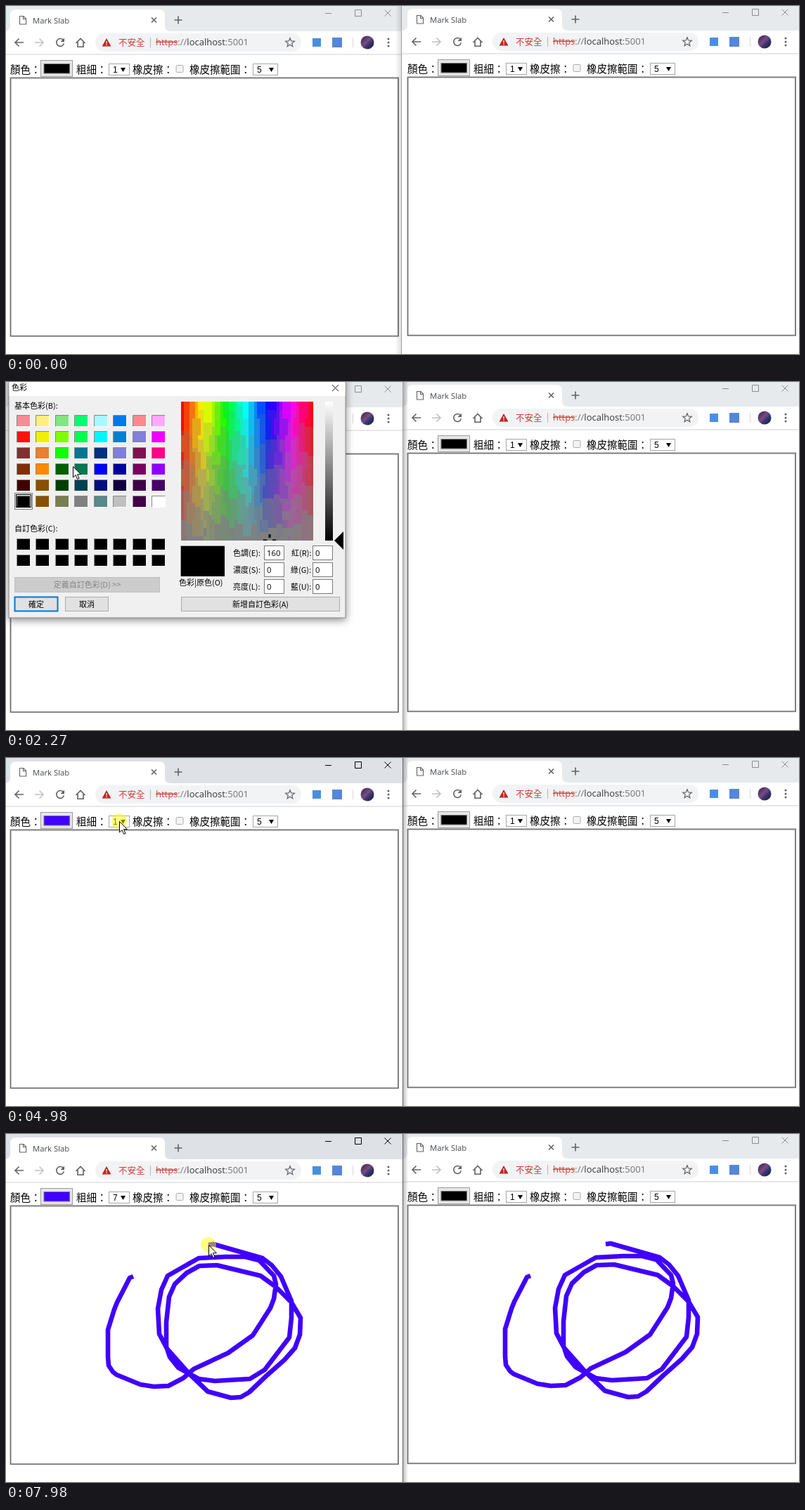
Write an HTML page that moves like this. It is 1128 px wide and 496 px high and loops after 8 s.

```html
<!DOCTYPE html>
<html lang="zh-Hant">
<head>
<meta charset="utf-8">
<title>Mark Slab</title>
<style>
  html, body { margin: 0; width: 100%; height: 100%; overflow: hidden; background: #fff; }
  svg { display: block; width: 1128px; height: 496px; }
  text { font-family: "Noto Sans CJK TC", "Noto Sans CJK JP", sans-serif; white-space: pre; }
  .ui { font-family: "Open Sans", "Noto Sans", sans-serif; }
  .form { font-family: "Liberation Sans", sans-serif; }
  .line { fill: none; stroke: #5f6368; stroke-width: 1.6; }
  .ink { fill: none; stroke: #4000ff; stroke-width: 6.6; stroke-linejoin: round; }
  #dialog { filter: drop-shadow(0 3px 6px #0007); }
</style>
</head>
<body>
<svg id="stage" viewBox="0 0 1128 496"></svg>
<script>
const LOOP = 8000;
const BLUE = '#4000ff';

const rect = (x, y, w, h, fill, extra = '') =>
  `<rect x="${x}" y="${y}" width="${w}" height="${h}" fill="${fill}" ${extra}/>`;
const path = (d, extra = 'class="line"') => `<path d="${d}" ${extra}/>`;
const text = (x, y, size, str, fill = '#000', extra = '') =>
  `<text x="${x}" y="${y}" font-size="${size}" fill="${fill}" ${extra}>${str}</text>`;
const circle = (x, y, r, fill) => `<circle cx="${x}" cy="${y}" r="${r}" fill="${fill}"/>`;
const times = (n, make) => Array.from({ length: n }, (_, i) => make(i)).join('');

function dropdown(x, w, value, id) {
  return rect(x + .5, 82.5, w - 1, 16, '#fff', 'stroke="#a6a6a6"') +
    text(x + 6, 95, 12, value, '#000', `class="form" id="${id}"`) +
    path(`M${x + w - 13} 88h7l-3.5 6z`, '');
}

function starPoints(cx, cy) {
  return times(10, i => {
    const r = i % 2 ? 2.9 : 6.6, a = i * Math.PI / 5 - Math.PI / 2;
    return `${cx + r * Math.cos(a)},${cy + r * Math.sin(a)} `;
  });
}

function browser(id) {
  const tab = 'M-2 36Q6 36 6 28V13Q6 5 14 5H218Q226 5 226 13V28Q226 36 234 36Z';
  return rect(0, 0, 565, 498, '#fff') +
    rect(0, 0, 565, 36, '#e7eaed', `id="${id}Strip"`) + path(tab, 'fill="#fff"') +
    path('M19.5 14.5h5.5l3.5 3.5v8h-9zM24.5 14.5v4h4', 'class="line" style="stroke-width:1.1"') +
    text(38, 25, 11.3, 'Mark Slab', '#45494d', 'class="ui"') +
    path('M207 16.5l7 7m0-7l-7 7M239.5 20h11M245 14.5v11') +
    path('M454 10.5h9M496.5 5.5h9v9h-9zM538.5 5.5l9 9m0-9l-9 9',
      `id="${id}Controls" fill="none" stroke="#8b8d90"`) +
    path('M25 52H13M18.5 46.5L13 52l5.5 5.5') +
    path('M41 52h12M47.5 46.5L53 52l-5.5 5.5', 'class="line" style="stroke:#bdc1c6"') +
    path('M81.2 48.3A5.4 5.4 0 1 0 82.4 53.5') + path('M83 45.5v5.5h-5.5z', 'fill="#5f6368"') +
    path('M99.5 53l6.5-6.5 6.5 6.5M102 51v7.2h8V51') +
    rect(127, 39, 293, 26, '#f1f3f4', 'rx="13"') +
    path('M143 46l6.5 11.5h-13z', 'fill="#c5221f"') +
    path('M143 50v3.5M143 54.6v1.4', 'stroke="#fff" stroke-width="1.3"') +
    text(160, 56.5, 12.5, '不安全', '#cf3a34') + rect(205, 45, 1, 14, '#d4a9a7') +
    text(213, 56, 13, '<tspan fill="#c8463f" text-decoration="line-through">https</tspan>' +
      '://<tspan fill="#34383c">localhost</tspan>:5001', '#70757a', 'class="ui"') +
    `<polygon points="${starPoints(404, 52.3)}" class="line" style="stroke-width:1.2"/>` +
    rect(436, 46, 12, 12, '#4a8fdf') + rect(464, 45, 14, 14, '#5586d8') +
    rect(493, 45, 1, 14, '#d5d7da') + circle(514, 52, 9.5, 'url(#avatar)') +
    times(3, i => circle(544, 47 + 5 * i, 1.5, '#5f6368')) +
    rect(0, 68.5, 565, 1, '#cfd1d4') +
    text(6, 96, 14.5, '顏色：') +
    rect(49.5, 77.5, 45, 23, '#e6e6e6', 'stroke="#9c9c9c"') +
    rect(54, 82.5, 36.5, 13.5, '#000', `stroke="#777" id="${id}Swatch"`) +
    text(100, 96, 14.5, '粗細：') + dropdown(146, 30, '1', id + 'Size') +
    text(180, 96, 14.5, '橡皮擦：') +
    rect(242, 84.5, 10, 10, '#f4f4f4', 'stroke="#ababab" rx="1.5"') +
    text(261, 96, 14.5, '橡皮擦範圍：') + dropdown(351, 36, '5', id + 'Eraser') +
    rect(6.5, 102.5, 551.5, 368, '#fff', 'stroke="#717171" stroke-width="1.8"') +
    `<polyline class="ink" id="${id}Ink"/>`;
}

const palette = [
  'f88b95 ffee80 80e880 00ff70 a8f8ff 0078f0 ff8890 ffa8ff',
  'ff1010 f0f000 80ff00 00ff50 00f8ff 0080d0 8080d8 f000ff',
  '803030 e88030 10ff00 007890 003080 8080d8 801050 ff0088',
  '803008 ff8800 006000 007850 0000ff 0000a0 780060 9000ff',
  '400000 885000 004000 004050 001080 100040 400048 480068',
  '000000 885000 788050 808080 588888 c0c0c0 400048 ffffff'
].map(row => row.split(' '));

function cell(col, row, fill, y) {
  const x = Math.round(15 + 27.45 * col) + .5, top = Math.round(y - 8) + .5;
  return rect(x, top, 19, 16, fill) +
    path(`M${x} ${top + 16}v-16h19`, 'fill="none" stroke="#888"') +
    path(`M${x} ${top + 16}h19v-16`, 'fill="none" stroke="#fff"');
}

// Hue runs across in coarse wobbling bands; each band fades to grey in its own steps.
function spectrum() {
  const cols = 47, rows = 33, bands = 26;
  const noise = (a, b) => Math.abs(Math.sin(a * 12.9898 + b * 78.233) * 43758.5453) % 1;
  const channel = (hue, sat, shift) => {
    const k = (shift + hue * 6) % 6;
    const pure = 255 * (1 - Math.max(0, Math.min(k, 4 - k, 1)));
    return Math.round(128 + (pure - 128) * sat);
  };
  return times(cols, i => times(rows, j => {
    const wobble = .8 * (noise(i, j >> 2) - .5);
    const band = Math.round((i + .5) / cols * bands + wobble);
    const step = 7, offset = noise(band, 7) * step;
    const level = Math.floor((j + offset) / step) * step - offset + step / 2;
    const sat = 1 - Math.max(0, Math.min(1, level / rows));
    const rgb = [5, 3, 1].map(s => channel(band / bands, sat, s));
    return rect(249 + 4 * i, 28 + 6 * j, 4, 6, `rgb(${rgb})`);
  }));
}

function button(x, y, w, h, label, id, stroke = '#adadad', fill = '#e1e1e1', ink = '#000') {
  return rect(x + .5, y + .5, w - 1, h - 1, fill, `stroke="${stroke}" id="${id}"`) +
    text(x + w / 2, y + 14.5, 11, label, ink, 'text-anchor="middle"');
}

function field(x, labelX, row, label, id) {
  const y = 233.5 + 24 * row;
  return text(labelX, y + 14, 11, label) + rect(x + .5, y, 28, 20, '#fff', 'stroke="#7a7a7a"') +
    text(x + 4, y + 14, 11.3, '0', '#000', `class="ui" id="${id}"`);
}

function dialog() {
  return rect(4, -8, 479, 344, '#f0f0f0', 'stroke="#8a8a8a"') + rect(4.5, -7, 478, 27, '#fff') +
    text(8, 12, 11, '色彩') + path('M464 4l9 9m0-9l-9 9', 'stroke="#222"') +
    text(12, 38, 11, '基本色彩(B):') +
    palette.map((colors, r) => colors.map((c, i) => cell(i, r, '#' + c, 55 + 22.9 * r)).join('')).join('') +
    `<g id="choice">${rect(12.5, 158.5, 25, 23, 'none', 'stroke="#000" stroke-dasharray="1 1"')}` +
    rect(14.5, 160.5, 21, 18, 'none', 'stroke="#000"') + '</g>' +
    text(12, 213, 11, '自訂色彩(C):') +
    times(16, i => cell(i % 8, 0, '#000', i < 8 ? 231 : 254)) +
    button(12, 278, 207, 22, '定義自訂色彩(D) &gt;&gt;', 'define', '#bfbfbf', '#ccc', '#858585') +
    button(12, 306, 62, 21, '確定', 'ok', '#0078d7" stroke-width="2') +
    button(84, 306, 62, 21, '取消', 'cancel') +
    button(249, 306, 226, 21, '新增自訂色彩(A)', 'add') +
    `<g clip-path="url(#spectrumClip)"><g shape-rendering="crispEdges">${spectrum()}</g>` +
    path('M-1.5 -9h3v5h-3zM-1.5 4h3v5h-3zM-9 -1.5h5v3h-5zM4 -1.5h5v3h-5z', 'id="cross"') + '</g>' +
    rect(454, 28, 11, 198, 'url(#shade)') + path('M467 0l13-13v26z', 'id="pointer"') +
    rect(249, 234, 62, 43, '#000', 'id="sample"') +
    path('M248.5 277V233.5h62.5', 'fill="none" stroke="#a0a0a0"') +
    text(246, 290, 11, '色彩|原色(O)') +
    field(367, 323, 0, '色調(E):', 'hue') + field(367, 323, 1, '濃度(S):', 'sat') +
    field(367, 323, 2, '亮度(L):', 'lum') + field(436, 406, 0, '紅(R):', 'red') +
    field(436, 405, 1, '綠(G):', 'green') + field(436, 405, 2, '藍(U):', 'blue');
}

const ROW = 13.7;
function popup() {
  return rect(146.5, 99.5, 29, 124.5, '#fff', 'stroke="#8a9bb0"') +
    rect(147, 100, 28, ROW, '#1e90ff', 'id="optionBar"') +
    times(9, i => text(151, 111 + ROW * i, 12, i + 1, '#000', `class="form" id="option${i}"`));
}

const gradient = (id, attrs, ...stops) => `<linearGradient id="${id}" ${attrs}>` +
  stops.map(([at, color, alpha = 1]) => `<stop offset="${at}" stop-color="${color}" stop-opacity="${alpha}"/>`).join('') +
  '</linearGradient>';

const stage = document.getElementById('stage');
stage.innerHTML = '<defs>' +
  gradient('avatar', 'x2="1" y2="1"', [0, '#30204c'], [.45, '#7b4b80'], [.6, '#3a3a78'], [1, '#1a1222']) +
  gradient('shade', 'x2="0" y2="1"', [0, '#fff'], [.5, '#808080'], [1, '#000']) +
  gradient('shadowLeft', '', [0, '#000', 0], [1, '#000', .14]) +
  gradient('shadowRight', '', [0, '#000', .25], [1, '#000', 0]) +
  '<clipPath id="spectrumClip"><path d="M249 28h188v198H249z"/></clipPath></defs>' +
  `<g transform="translate(565 -1)">${browser('right')}</g>${browser('left')}` +
  `<g id="rightEdge">${rect(554, 0, 9, 496, 'url(#shadowLeft)')}` +
  `${rect(563, 0, 3, 35, '#e7eaed')}${rect(563, 35, 3, 461, '#fff')}` +
  `${rect(563, 67.5, 3, 1, '#cfd1d4')}${rect(562, 0, 1, 496, '#a3a3a3')}</g>` +
  `<g id="leftEdge">${rect(565, 0, 7, 496, 'url(#shadowRight)')}` +
  `${rect(564, 0, 1, 496, '#999', 'id="edgeLine"')}</g>` +
  `<g id="popup">${popup()}</g><g id="dialog">${dialog()}</g>` +
  `<g id="mouse"><circle id="glow" r="11" fill="#ff0" fill-opacity=".5"/>` +
  path('M.5 .5V16l3.6-3.4 2.5 5.8 2.4-1-2.5-5.7H11.4z', 'fill="#fff" stroke="#000"') + '</g>';

const el = Object.fromEntries([...stage.querySelectorAll('[id]')].map(node => [node.id, node]));
const set = (id, name, value) => el[id].setAttribute(name, value);
const show = (id, on) => set(id, 'visibility', on ? 'visible' : 'hidden');
const mix = (a, b, p) => a + (b - a) * p;
const smooth = p => p * p * (3 - 2 * p);
const progress = (t, from, to) => smooth(Math.min(1, Math.max(0, (t - from) / (to - from))));

// Value of a track of [time, ...values] keys at time t.
function track(keys, t, ease = p => p) {
  const next = keys.findIndex(k => k[0] > t);
  if (next < 0) return keys[keys.length - 1].slice(1);
  if (!next) return keys[0].slice(1);
  const a = keys[next - 1], b = keys[next], p = ease((t - a[0]) / (b[0] - a[0]));
  return a.slice(1).map((v, i) => mix(v, b[i + 1], p));
}

const strokeParts = [
  '181,203 176,205 158,240 154,250 145,279 145,300 145,318',
  '146,330 152,339 157,343 191,357 210,360 231,359 252,348 267,335 316,312 351,287 362,270 376,248 381,235 384,214 381,202 360,180 340,175 312,175 274,177',
  '230,202 221,222 216,249 218,285 229,306 260,341 287,367 320,376 334,375 346,368',
  '370,345 396,322 411,305 418,286 419,262 406,240 384,218 362,202 300,187 275,188 257,198 240,214 232,232 228,268 228,303 233,318 245,333 274,349 297,352 347,349 368,336 403,290 406,262 406,238 391,203 378,187 365,177 295,157 288,158'
].map(part => part.split(' ').map(p => p.split(',').map(Number)));
const points = strokeParts.flat();
const partEnd = n => strokeParts.slice(0, n).flat().length - 1;
const penKeys = [[6050, 0], [6500, partEnd(1)], [6530, partEnd(1)], [7010, partEnd(2)],
  [7320, partEnd(3)], [7370, partEnd(3)], [7980, partEnd(4)]];

function drawn(t) {
  const [at] = track(penKeys, t), i = Math.floor(at);
  const a = points[i], b = points[i + 1] || a;
  return [...points.slice(0, i + 1), a.map((v, k) => mix(v, b[k], at - i))];
}

const mouseKeys = [
  [160, 870, 442], [260, 581, 340], [620, 581, 340], [850, 437, 264], [1050, 437, 264],
  [1690, 95, 96], [2040, 95, 96], [2180, 95, 120], [2320, 95, 120], [2550, 135, 118],
  [3020, 135, 118], [3230, 238, 205], [3470, 104, 312], [3560, 104, 312], [3810, 46, 310],
  [4180, 46, 310], [4680, 179, 99], [4770, 179, 99], [4810, 161, 90], [5090, 161, 90],
  [5320, 165, 189], [5700, 165, 189], [5980, 181, 203]
];
const presses = [[1700, 1920], [2690, 2870], [3890, 4020], [4980, 5070], [5350, 5430], [6050, LOOP]];

function render(t) {
  const drawing = t >= 6050;
  const ink = drawing ? drawn(t) : [];
  const [x, y] = drawing ? ink[ink.length - 1] : track(mouseKeys, t, smooth);
  set('mouse', 'transform', `translate(${x} ${y})`);
  show('mouse', t >= 160);
  set('glow', 'visibility', presses.some(([a, b]) => t >= a && t < b) ? 'inherit' : 'hidden');
  for (const id of ['leftInk', 'rightInk']) set(id, 'points', ink.join(' '));

  const active = t >= 1700 && t < 1970 || t >= 4100;
  set('leftStrip', 'fill', active ? '#dee1e6' : '#e7eaed');
  set('leftControls', 'stroke', active ? '#000' : '#8b8d90');
  set('edgeLine', 'fill', active ? '#666' : '#a3a3a3');
  show('rightEdge', t < 1700);
  show('leftEdge', t >= 1700);
  set('leftSwatch', 'fill', t >= 4100 ? BLUE : '#000');
  el.leftSize.textContent = t >= 5400 ? 7 : 1;

  const open = progress(t, 1990, 2200) * (1 - progress(t, 4020, 4230));
  show('dialog', open > 0);
  set('dialog', 'opacity', open);
  set('dialog', 'transform', `translate(243.5 140) scale(${mix(.95, 1, open)}) translate(-243.5 -140)`);
  const chosen = t >= 2720;
  set('choice', 'transform', chosen ? 'translate(110 -46)' : '');
  set('cross', 'transform', `translate(375 ${chosen ? 28 : 226})`);
  set('pointer', 'transform', `translate(0 ${chosen ? 127 : 226})`);
  set('sample', 'fill', chosen ? '#00f' : '#000');
  el.shade.children[1].setAttribute('stop-color', chosen ? '#00f' : '#808080');
  const values = { hue: 160, sat: chosen ? 240 : 0, lum: chosen ? 120 : 0, blue: chosen ? 255 : 0 };
  for (const id in values) el[id].textContent = values[id];
  const over = left => y >= 306 && y <= 327 && x >= left && x <= left + 62;
  set('ok', 'fill', over(12) ? '#e5f1fb' : '#e1e1e1');
  set('cancel', 'fill', over(84) ? '#dfe8ee' : '#e1e1e1');
  set('cancel', 'stroke', over(84) ? '#7fa9c6' : '#adadad');

  show('popup', t >= 5070 && t < 5400);
  const row = Math.min(8, Math.max(0, Math.floor((y - 100) / ROW)));
  set('optionBar', 'y', 100 + row * ROW);
  for (let i = 0; i < 9; i++) set('option' + i, 'fill', i === row ? '#fff' : '#000');
}

function frame() {
  render(performance.now() % LOOP);
  requestAnimationFrame(frame);
}
frame();
</script>
</body>
</html>
```
